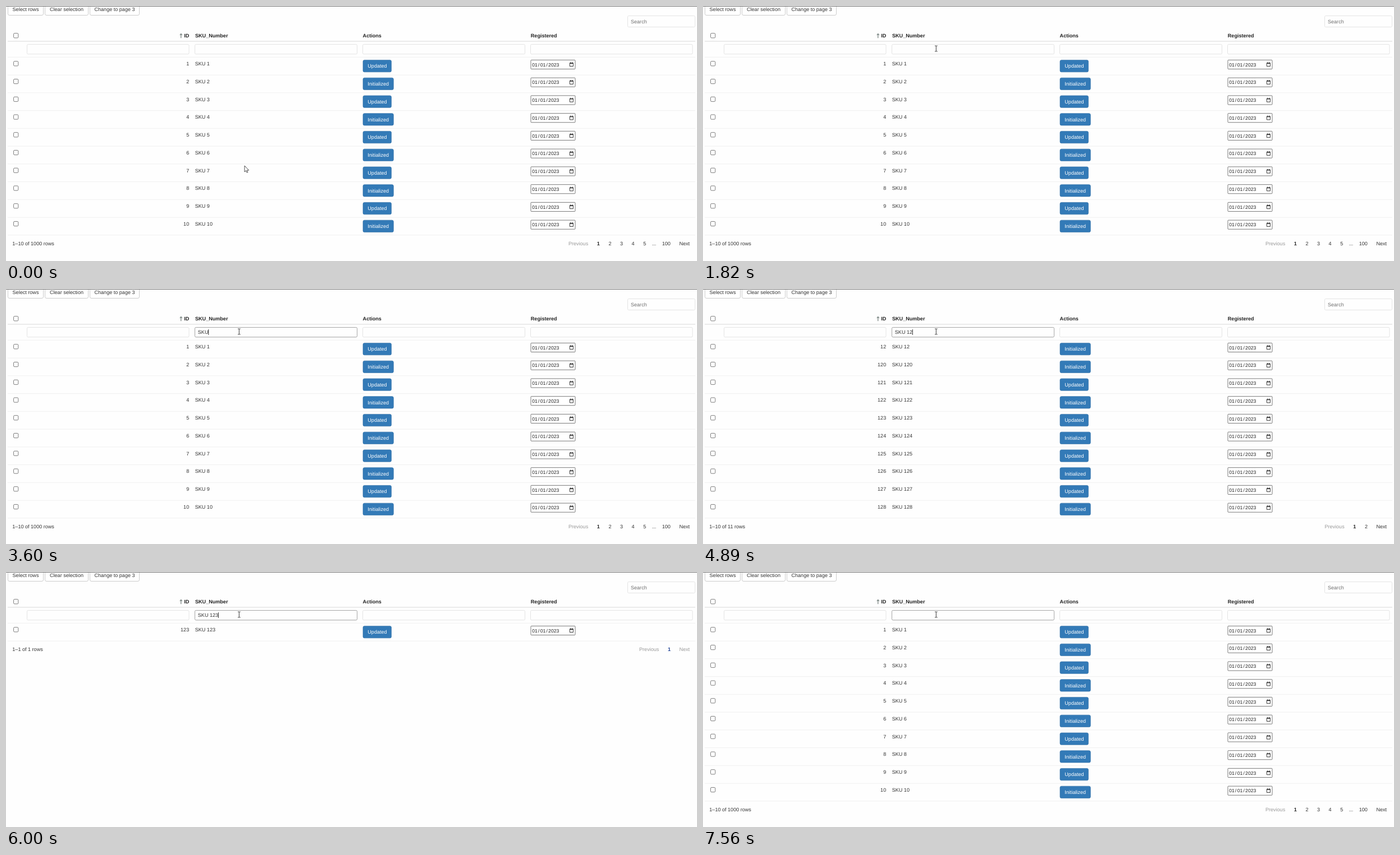
Recreate the animation shown at these times as an HTML page. Size 1231 by 455 pixels, loop 8000 ms.

```html
<!DOCTYPE html>
<html lang="en">
<head>
<meta charset="utf-8">
<title>Table filter</title>
<style>
  html, body { margin: 0; width: 100%; height: 100%; overflow: hidden; background: #fefefe; }
  svg { display: block; width: 100vw; height: 100vh; }
  text {
    font: 9.07px "Liberation Sans", Arial, Helvetica, sans-serif;
    fill: #333; white-space: pre; text-rendering: geometricPrecision;
  }
  .bold { font-weight: 700; fill: #222; }
  .only { font-weight: 700; fill: #1c3f94; }
  .off { fill: #999; }
  .hint { fill: #707070; }
  .white { fill: #fff; }
  .date { font-size: 8.64px; fill: #222; }
  .field { fill: #fefefe; stroke: #e4e4e4; }
  .focus { stroke: #a6a6a6; }
  .plain { fill: #fff; stroke: #ccc; }
  .action { fill: #337ab7; stroke: #2e6da4; stroke-width: .65; }
  .box { fill: #fff; stroke: #6c6c6c; stroke-width: .9; }
</style>
</head>
<body>
<svg viewBox="0 0 1231 455" preserveAspectRatio="none">
  <g id="frame"></g>
  <g id="table"></g>
  <g id="input"></g>
  <path id="arrow" d="M0 0V11L2.5 8.7 4.1 12.3 5.8 11.6 4.2 8.1H7.6Z" fill="#fff" stroke="#222" stroke-width=".8"/>
  <path id="beam" d="M-2.3-5H-.6L0-4.5.6-5H2.3M-2.3 5H-.6L0 4.5.6 5H2.3M0-4.5V4.5" fill="none" stroke="#222" stroke-width=".9"/>
</svg>
<script>
const LOOP = 8000, PITCH = 31.75, EM = 9.07;
const $ = id => document.getElementById(id);

const text = (x, y, s, cls = "", anchor = "start") =>
  `<text x="${x}" y="${y}" class="${cls}" text-anchor="${anchor}">${s}</text>`;
const rect = (x, y, x2, y2, cls, r = 2) =>
  `<rect x="${x}" y="${y}" width="${x2 - x}" height="${y2 - y}" rx="${r}" class="${cls}"/>`;
const line = (y, color, w) =>
  `<path d="M3 ${y}H1228" stroke="${color}" stroke-width="${w}"/>`;
const check = y => rect(13.6, y - 4.1, 21.8, y + 4.1, "box", 1.6);

// start time, filter text, caret visible
const STATES = [
  [0, "", 0], [2010, "", 1], [2530, "", 0], [3050, "", 1],
  [3260, "S", 1], [3420, "SK", 1], [3600, "SKU", 1], [3940, "SKU ", 1],
  [4530, "SKU ", 0], [4710, "SKU 1", 1], [4890, "SKU 12", 1], [4950, "SKU 123", 1],
  [5470, "SKU 123", 0], [6000, "SKU 123", 1], [6430, "SKU 12", 1],
  [6520, "SKU 1", 1], [6950, "SKU ", 1], [7040, "", 1], [7560, "", 0]
];
const ADVANCE = { S: .667, K: .667, U: .722, " ": .278 };
const widthOf = s => [...s].reduce((w, c) => w + (ADVANCE[c] || .556) * EM, 0);

function frameMarkup() {
  const buttons = [[3.5, 66.5, "Select rows"], [69.5, 146.5, "Clear selection"], [149.5, 237.5, "Change to page 3"]];
  const fields = [[37.5, 326], [336.5, 625.5], [635.5, 924.5], [934.5, 1223]];
  return buttons.map(([a, b, s]) =>
      rect(a, -6, b, 16.5, "plain", 2.6) + text((a + b) / 2, 9.2, s, "", "middle")).join("") +
    '<path d="M0 .5H1231" stroke="#777"/>' +
    rect(1107.5, 17.5, 1227.5, 37.5, "field") + text(1113, 30.6, "Search", "hint") +
    check(52.8) +
    '<path d="M311.8 57.2V49.6M309.8 51.9L311.8 49.4 313.8 51.9" fill="none" stroke="#40514c" stroke-width=".9"/>' +
    text(326.2, 56, "ID", "bold", "end") + text(337, 56, "SKU_Number", "bold") +
    text(635.6, 56, "Actions", "bold") + text(934.8, 56, "Registered", "bold") +
    line(62.8, "#e0e0e0", 1.3) +
    fields.map(([a, b]) => rect(a, 68.5, b, 85.8, "field")).join("") +
    line(91.3, "#f0f0f0", 1);
}

function dateBox(y) {
  const parts = [[937.3, "01"], [948.1, "/"], [951.7, "01"], [962.5, "/"], [966.1, "2023"]];
  return rect(935, y - 8.1, 1014, y + 8, "box", 1) +
    parts.map(([x, s]) => text(x, y + 3.2, s, "date")).join("") +
    `<path d="M1004.4 ${y - 2.8}h6v6h-6zM1004.4 ${y - 2}h6M1005.6 ${y - 4.2}v1.4M1009.2 ${y - 4.2}v1.4" fill="none" stroke="#222" stroke-width=".9"/>`;
}

function rowMarkup(id, i) {
  const y = 102.8 + i * PITCH;
  const label = id % 2 ? "Updated" : "Initialized";
  return check(y) + text(326.2, y + 3.2, id, "", "end") + text(336.7, y + 3.2, "SKU " + id) +
    rect(636, y - 6.4, id % 2 ? 686.5 : 690.3, y + 15, "action", 2.6) +
    text(644.3, y + 7.6, label, "white") +
    dateBox(y + 1.7) + line(y + 20.3, "#f0f0f0", 1);
}

function pagerMarkup(pages, y) {
  const labels = [];
  for (let p = 1; p <= Math.min(pages, 5); p++) labels.push(p);
  if (pages > 5) labels.push("...", pages);
  let right = 1191.7, out = text(1199.5, y, "Next", pages > 1 ? "" : "off");
  for (const s of labels.reverse()) {
    const w = s === "..." ? 13 : String(s).length * .556 * EM + 15.56;
    const cls = s !== 1 ? "" : pages > 1 ? "bold" : "only";
    out += text(right - w / 2, y, s, cls, "middle");
    right -= w;
  }
  return out + text(right - 7.8, y, "Previous", "off", "end");
}

function tableMarkup(query) {
  const ids = [];
  for (let id = 1; id <= 1000; id++) if (("SKU " + id).includes(query)) ids.push(id);
  const shown = ids.slice(0, 10);
  const y = 109 + shown.length * PITCH;
  return shown.map(rowMarkup).join("") +
    text(11.3, y, `1–${shown.length} of ${ids.length} rows`) +
    pagerMarkup(Math.ceil(ids.length / 10), y);
}

function inputMarkup(query, caret, focused) {
  if (!focused) return "";
  const x = 342.1 + widthOf(query);
  return rect(336.5, 68.5, 625.5, 85.8, "field focus") + text(341.8, 80.2, query) +
    (caret ? `<path d="M${x} 72V82" stroke="#222" stroke-width=".9"/>` : "");
}

function pointer(t) {
  if (t < 810) return [425, 285];
  if (t < 1640) {
    const k = Math.min(10, Math.floor((t - 810) / 82.2) + 1) / 10;
    const e = (k + k * k * (3 - 2 * k)) / 2;
    return [425 - 7.7 * e, 285 - 195 * e];
  }
  const k = Math.min(3, Math.floor((t - 1640) / 90) + 1) / 3;
  return [417.3 - 2 * k, 90 - 14 * (1 - (1 - k) ** 2)];
}

let lastTable = null, lastInput = null;
function draw(t) {
  const [, query, caret] = STATES.filter(s => s[0] <= t).pop();
  const table = tableKey(query);
  if (table !== lastTable) $("table").innerHTML = tableMarkup(lastTable = table);
  const input = inputMarkup(query, caret, t >= 2010);
  if (input !== lastInput) $("input").innerHTML = lastInput = input;

  const [x, y] = pointer(t), over = y < 86;
  $("arrow").setAttribute("visibility", over ? "hidden" : "visible");
  $("beam").setAttribute("visibility", over ? "visible" : "hidden");
  $(over ? "beam" : "arrow").setAttribute("transform", `translate(${x} ${y})`);
}
const tableKey = query => query.length > 4 ? query : "";

$("frame").innerHTML = frameMarkup();
draw(0);
const start = performance.now();
(function tick() {
  draw((performance.now() - start) % LOOP);
  requestAnimationFrame(tick);
})();
</script>
</body>
</html>
```
